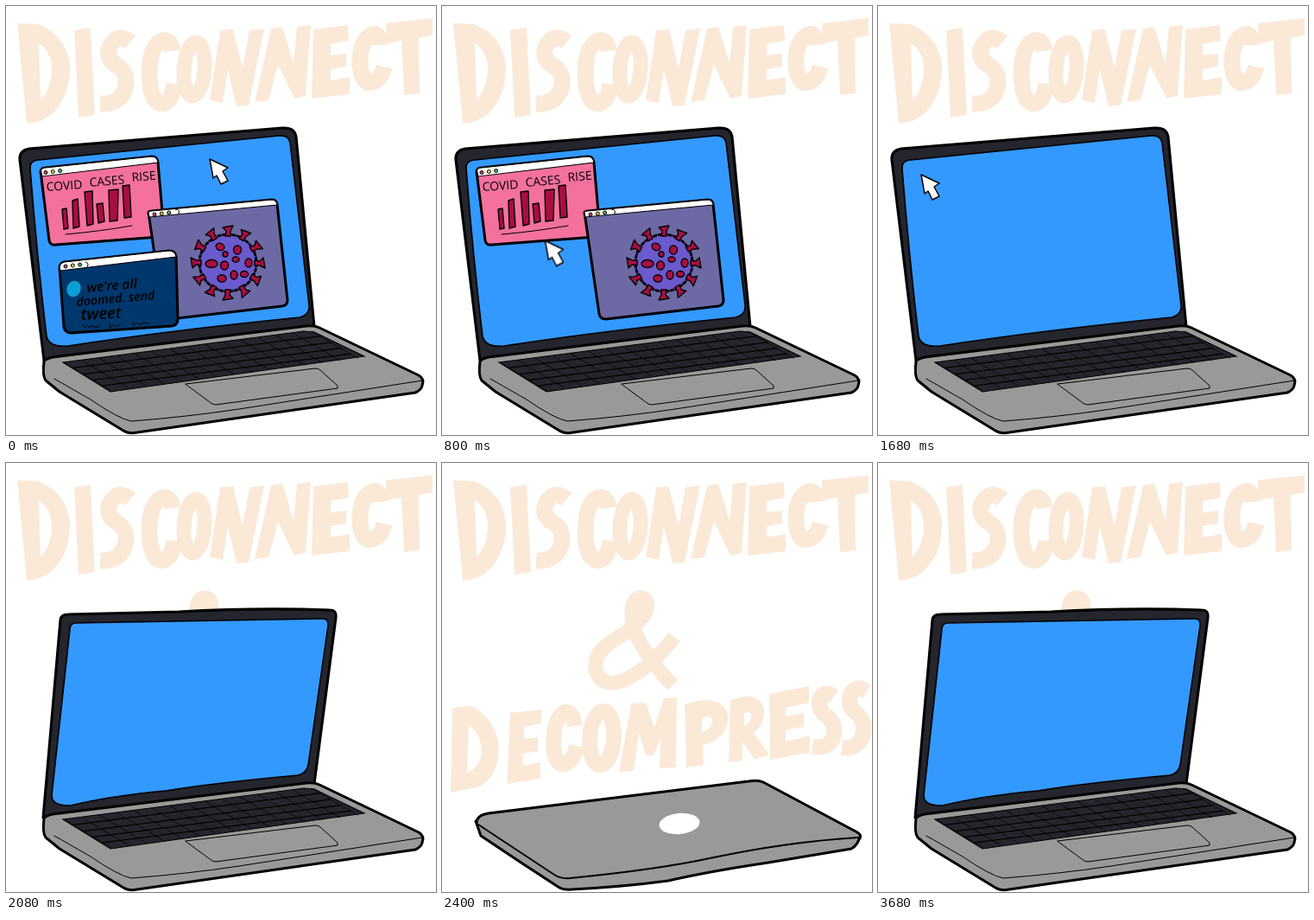
Animation of 498 by 496 pixels, one loop 3760 ms. Source, as an HTML page:

```html
<!DOCTYPE html>
<html lang="en">
<head>
<meta charset="utf-8">
<title>Disconnect &amp; Decompress</title>
<style>
html, body { margin: 0; width: 100%; height: 100%; overflow: hidden; background: #fff; }
svg { display: block; width: 100%; height: 100%; }
.ink { stroke: #000; stroke-width: 3; stroke-linejoin: round; stroke-linecap: round; }
.thin { stroke: #000; stroke-width: 1; fill: none; stroke-linecap: round; stroke-linejoin: round; }
.case { fill: #24252d; }
.screen { fill: #39f; stroke: #000; stroke-width: 1.6; }
.metal { fill: #999; }
.letters { fill: #fbe9d8; fill-rule: evenodd; }
.brush { fill: none; stroke: #fbe9d8; }
.red { fill: #a80e43; stroke: #000; stroke-width: 1.4; stroke-linejoin: round; }
.caps { font: 14px "Open Sans", "Noto Sans", sans-serif; }
.note { font: italic 600 14.2px "Open Sans", "Noto Sans", sans-serif; }
.light { stroke: #000; stroke-width: 1.1; }

/* one loop is 47 ticks of 80 ms */
.pose, .win, .cursor { animation: 3760ms step-end infinite; }
.p0 { animation-name: p0; }
.p1 { animation-name: p1; }
.p2 { animation-name: p2; }
.p3 { animation-name: p3; }
.p4 { animation-name: p4; }
.p5 { animation-name: p5; }
.tweet { animation-name: tweet; }
.virus { animation-name: virus; }
.chart { animation-name: chart; }
.cursor { animation-name: cursor; }
@keyframes p0 { 0% { opacity: 1 } 55.31%, 100% { opacity: 0 } }
@keyframes p1 { 0% { opacity: 0 } 55.31% { opacity: 1 } 57.44% { opacity: 0 } 97.86%, 100% { opacity: 1 } }
@keyframes p2 { 0% { opacity: 0 } 57.44% { opacity: 1 } 59.57% { opacity: 0 } 95.74% { opacity: 1 } 97.86%, 100% { opacity: 0 } }
@keyframes p3 { 0% { opacity: 0 } 59.57% { opacity: 1 } 61.69% { opacity: 0 } 93.61% { opacity: 1 } 95.74%, 100% { opacity: 0 } }
@keyframes p4 { 0% { opacity: 0 } 61.69% { opacity: 1 } 63.82% { opacity: 0 } 91.48% { opacity: 1 } 93.61%, 100% { opacity: 0 } }
@keyframes p5 { 0% { opacity: 0 } 63.82% { opacity: 1 } 91.48%, 100% { opacity: 0 } }
@keyframes tweet { 0% { opacity: 1 } 14.89%, 100% { opacity: 0 } }
@keyframes virus { 0% { opacity: 1 } 27.65%, 100% { opacity: 0 } }
@keyframes chart { 0% { opacity: 1 } 44.67%, 100% { opacity: 0 } }
@keyframes cursor {
  0% { transform: translate(236px, 177px); animation-timing-function: steps(6, end); }
  12.76% { transform: translate(68px, 304px); }
  17.01% { transform: translate(68px, 304px); animation-timing-function: steps(4, end); }
  25.52% { transform: translate(171px, 239px); }
  29.78% { transform: translate(171px, 239px); animation-timing-function: steps(6, end); }
  42.54%, 100% { transform: translate(50px, 195px); }
}
</style>
</head>
<body>
<svg viewBox="0 0 498 496" preserveAspectRatio="none" role="img" aria-label="Disconnect &amp; Decompress">
<defs>
  <g id="amp" class="brush" stroke-width="17">
    <path d="M267 257Q222 208 220 180Q218 157 231 155.500Q242 158 235 174Q228 187 200 204Q175 219 178 239Q184 261 211 251Q243 236 269 201"/>
  </g>
  <g id="decompress">
    <g class="letters">
      <path d="M12 283L34 281Q63 296 66 330Q65 362 44 374L10 381ZM31 303Q46 315 46 334Q44 352 29 358Z"/>
      <path d="M79 289L115 285V301L95 305V319L111 317V333L94 336V350L114 346V365L75 371Z"/>
      <path d="M219 278L236 277L246 306L257 272L272 271L271 352L252 353L253 318L245 338H236L228 312L222 356L205 357Z"/>
      <path d="M281 279Q322 265 331 290Q334 318 302 326L303 349L283 352ZM301 295Q314 290 313 300Q311 308 301 311Z"/>
      <path d="M334 274Q369 262 373 286Q373 304 361 312L379 337L362 343L348 322V344L332 346ZM350 290Q359 285 358 295Q356 301 350 304Z"/>
      <path d="M379 267L425 258V277L398 283V293L419 289V305L398 309V322L426 315V335L380 343Z"/>
    </g>
    <g class="brush" stroke-width="18">
      <path d="M154 304Q152 287 142 288Q129 296 129 325Q130 350 142 348Q153 344 156 327"/>
      <ellipse cx="185" cy="318" rx="14" ry="31" transform="rotate(4 185 318)"/>
      <path d="M454 270Q441 261 437 275Q436 287 447 294Q458 304 453 318Q446 331 429 328"/>
      <path d="M492 264Q477 255 472 270Q470 283 481 290Q491 300 487 316Q480 332 463 329"/>
    </g>
  </g>

  <g id="base">
    <path class="metal ink" d="M44 411Q45 408 54 406L348 370Q357 369 363 372L478 427Q485 431 482 439Q481 444 474 447L152 493Q142 495 136 491L62 446L46 433Q42 428 44 411Z"/>
    <path class="thin" d="M56 431L98 455Q130 477 145 480Q210 475 270 466L482 433"/>
    <path class="case light" d="M66 412L345 376L357 377L415 405L121 446Z"/>
    <g transform="matrix(288 -37 56 33 66 412)" fill="none" stroke="#000">
      <path d="M0 .5H1" stroke-width=".96" stroke-dasharray=".003 .068"/>
      <path d="M0 .2H1M0 .42H1M0 .62H1M0 .82H1" stroke-width=".03"/>
    </g>
    <path class="thin" d="M208 437L358 419Q362 419 364 421L384 439V442L243 461Q239 461 236 458Z"/>
  </g>

  <g id="dots" stroke="#000" stroke-width="1">
    <circle r="2" fill="#e2466f"/>
    <circle cx="8.300" cy="-1" r="2" fill="#f5d63a"/>
    <circle cx="16.600" cy="-2" r="2" fill="#4fb56c"/>
  </g>
  <path id="spike" class="red" d="M-3-31L-2-37L-6-41L6-43L3-37V-31Z"/>
  <g id="spikes">
    <use href="#spike"/>
    <use href="#spike" transform="rotate(30)"/>
    <use href="#spike" transform="rotate(60)"/>
  </g>
</defs>

<rect width="498" height="496" fill="#fff"/>

<g class="letters">
  <path d="M13 20L37 21Q70 34 74 68Q75 104 54 124Q42 135 24 136ZM38 43Q54 54 53 76Q51 98 40 108Z"/>
  <path d="M79 28L98 25L103 126L84 129Z"/>
  <path d="M248 28L263 27L274 72L282 28L299 26L281 115L267 116L257 74L251 112L236 109Z"/>
  <path d="M307 26L320 24L333 66L337 24L353 22L347 104L334 107L315 68L304 109L288 111Z"/>
  <path d="M356 27L396 22L397 40L376 44V57L394 55V70L376 73V86L398 82V102L354 107Z"/>
  <path d="M440 20L494 14V34L478 37L479 101L461 103L458 40L441 43Z"/>
</g>
<g class="brush" stroke-width="19">
  <path d="M144 42Q131 31 122 44Q113 58 127 68Q143 77 138 95Q132 114 109 113"/>
  <path d="M193 52Q191 38 181 40Q166 46 166 80Q167 112 181 113Q192 111 195 90"/>
  <ellipse cx="218" cy="73" rx="12" ry="31" transform="rotate(4 218 73)" stroke-width="17"/>
  <path d="M434 45Q433 30 424 33Q409 40 410 68Q412 92 425 88Q435 84 438 70"/>
</g>

<g class="pose p0">
  <path class="case ink" d="M44 410L16 178Q15 167 27 165L320 141Q334 140 336 151L357 371Z"/>
  <path class="screen" d="M28 188Q27 179 38 178L316 150Q327 149 329 158L351 346Q352 357 340 360Q190 375 72 393Q50 395 47 382Q36 290 28 188Z"/>

  <g class="win chart">
    <path class="ink" fill="#f4719e" d="M40 191Q41 187 46 187L169 174Q175 174 176 181L183 262Q183 267 177 267L58 276Q51 277 50 271Z"/>
    <path class="light" fill="#fff" d="M40.500 190.500Q41 187 46 187L169 174Q175 174 176 181L42 197Z"/>
    <use href="#dots" x="46" y="192.500"/>
    <g class="caps">
      <text transform="translate(47 214) rotate(-4)">COVID</text>
      <text transform="translate(97 209) rotate(-5)">CASES</text>
      <text transform="translate(146 203) rotate(-5)">RISE</text>
    </g>
    <path class="red" d="M65 235L70 234L72 257L67 258ZM77 225L83 223L85 255L78 257ZM91 215L100 214L101 252L94 254ZM105 229L112 228L114 249L107 251ZM119 213L130 212L129 248L120 249ZM135 208L143 207L145 244L137 245Z"/>
    <path class="thin" d="M69 264Q105 261 146 254"/>
  </g>

  <g class="win virus">
    <path class="ink" fill="#6c69a5" d="M165 239Q165 237 169 237L308 224Q313 224 314 229L326 340Q326 346 320 347L190 362Q183 362 182 356Z"/>
    <path class="light" fill="#fff" d="M165 239Q165 237 169 237L308 224Q313 224 314 230L166 244Z"/>
    <use href="#dots" x="172" y="241"/>
    <path class="thin" d="M196 235Q202 235 200 240"/>
    <g transform="translate(257 297)">
      <circle r="33" fill="#6a5acd" stroke="#000" stroke-width="2.800" stroke-dasharray="5 .7"/>
      <use href="#spikes"/>
      <use href="#spikes" transform="rotate(90)"/>
      <use href="#spikes" transform="rotate(180)"/>
      <use href="#spikes" transform="rotate(270)"/>
      <g class="red">
        <ellipse cx="-16" cy="-13" rx="5" ry="4" transform="rotate(25)"/>
        <ellipse cx="11" cy="-15" rx="4.500" ry="5"/>
        <ellipse cx="-3" cy="-10" rx="3" ry="3"/>
        <ellipse cx="-19" cy="1" rx="7" ry="4.500"/>
        <ellipse cx="24" cy="0" rx="4" ry="5"/>
        <ellipse cx="9" cy="-4" rx="4" ry="3"/>
        <ellipse cx="-4" cy="3" rx="4.500" ry="5"/>
        <ellipse cx="-7" cy="18" rx="5" ry="4"/>
        <ellipse cx="7" cy="14" rx="4" ry="5"/>
        <ellipse cx="19" cy="13" rx="4.500" ry="3.500"/>
      </g>
    </g>
  </g>

  <g class="win tweet">
    <path class="ink" fill="#00376c" d="M62 303Q62 297 68 296L189 283Q196 283 197 290L199 362Q199 369 192 370L76 378Q68 378 67 371Z"/>
    <path class="light" fill="#fff" d="M62 303Q62 297 68 296L189 283Q196 283 197 290L63 306Z"/>
    <use href="#dots" x="69" y="301"/>
    <path class="thin" d="M92 296Q97 297 94 302"/>
    <ellipse cx="78.500" cy="327" rx="8" ry="9.500" fill="#0a9fd3" transform="rotate(20 78.500 327)"/>
    <g class="note">
      <text transform="translate(94 331) rotate(-5)" font-size="15.500" style="font-size:15.5px">we're all</text>
      <text transform="translate(82 347) rotate(-5)">doomed. send</text>
      <text transform="translate(87 363) rotate(-3)" style="font-size:18.5px">tweet</text>
    </g>
    <path class="thin" d="M89 368L91 372L94 369L97 372L100 369L102 372L109 370M120 367V372L125 369L128 371L133 367M147 365V370L152 366L155 369L159 366L165 367"/>
  </g>

  <path class="cursor" fill="#fff" stroke="#000" stroke-width="1.500" stroke-linejoin="round" d="M0 0L21 10L15 14L21 25L13 29L8 19L4 22Z"/>
  <use href="#base"/>
</g>

<g class="pose p1" opacity="0">
  <use href="#amp"/>
  <path class="case ink" d="M43 410L63 181Q64 175 72 175L200 172Q290 167 375 170Q383 170 382 179L357 371Z"/>
  <path class="screen" d="M53 384L74 192Q74 186 80 185L367 180Q374 180 373 188L350 349Q348 359 338 361Q240 370 185 379Q120 385 75 396Q53 397 53 384Z"/>
  <use href="#base"/>
</g>

<g class="pose p2" opacity="0">
  <use href="#amp"/>
  <use href="#decompress"/>
  <path fill="#fff" d="M0 275L498 235V496H0Z"/>
  <path class="case ink" d="M43 410L98 272Q102 265 110 264L428 238Q440 238 437 247L357 371Z"/>
  <path class="screen" d="M57 390L109 281Q112 276 118 275L420 250Q426 250 423 256L352 355Q346 362 338 363L75 396Q54 399 57 390Z"/>
  <use href="#base"/>
</g>

<g class="pose p3" opacity="0">
  <use href="#amp"/>
  <use href="#decompress"/>
  <path class="case ink" d="M43 410L122 368Q128 364 136 363L465 325Q476 324 471 331L357 371Z"/>
  <path class="screen" d="M68 402L134 372L452 335L352 365Z"/>
  <use href="#base"/>
</g>

<g class="pose p4" opacity="0">
  <use href="#amp"/>
  <use href="#decompress"/>
  <path class="metal ink" d="M44 414L46 426Q62 444 98 468L136 491Q142 495 152 493Q230 484 330 467L478 443Q482 440 481 426L360 390Z"/>
  <path class="metal ink" d="M44 414Q46 406 64 403L350 367Q360 365 367 368L484 415Q491 419 488 424Q484 427 474 427Q400 433 330 446Q240 461 142 470Q135 471 128 467L50 422Q44 418 44 414Z"/>
  <path class="thin" d="M98 455Q130 477 150 478Q240 472 320 456T480 433"/>
  <ellipse cx="267" cy="410.500" rx="21" ry="13" fill="#fff" transform="rotate(-7 267 410)"/>
</g>

<g class="pose p5" opacity="0">
  <use href="#amp"/>
  <use href="#decompress"/>
  <path class="metal ink" d="M39 414L45 431L90 461L136 491Q141 494 150 493Q210 490 262 483Q310 472 378 462L474 446Q482 442 484 431L300 410Z"/>
  <path class="metal" d="M42 416Q41 407 54 405L355 368Q366 366 372 369L481 427Q488 431 479 434Q400 438 310 457Q250 470 148 480Q138 481 130 476L48 424Q43 421 42 416Z"/>
  <path class="thin" stroke-linecap="round" style="stroke-width:2" d="M42 418L130 476Q138 481 148 480Q250 470 310 457Q400 438 482 433"/>
  <path class="ink" fill="none" d="M40 415Q41 407 54 405L355 368Q366 366 372 369L481 427Q486 430 484 434"/>
  <ellipse cx="275" cy="417" rx="23.500" ry="12" fill="#fff" transform="rotate(-5 275 417)"/>
</g>
</svg>
</body>
</html>
```
